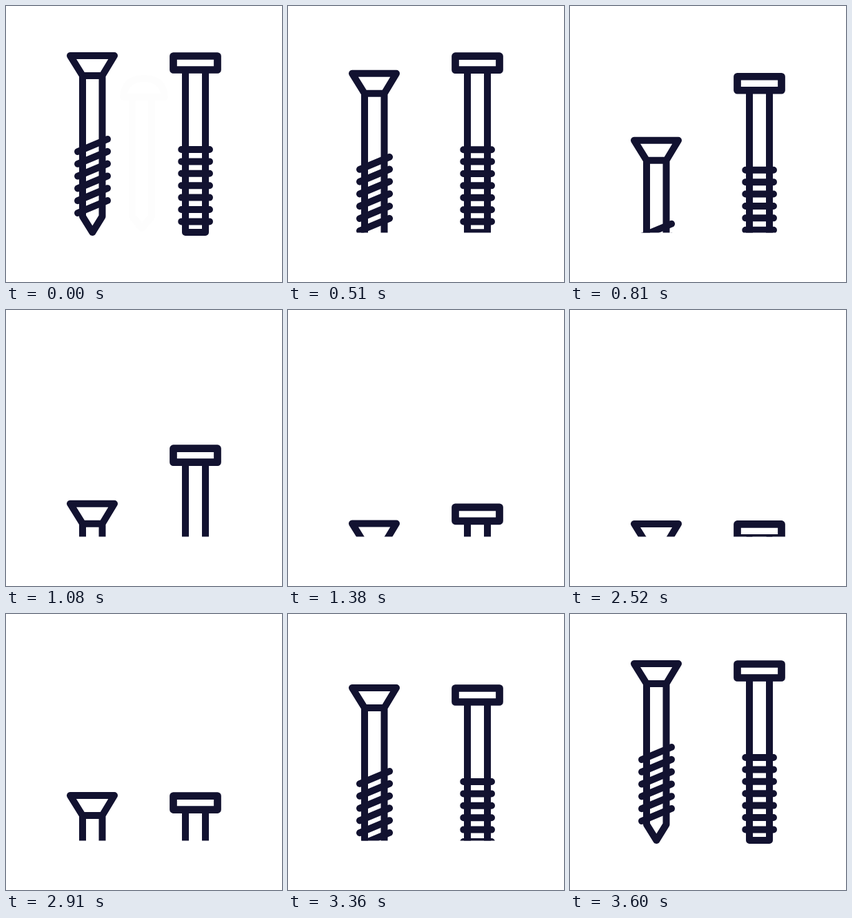
Write an HTML page that moves like this. It is 400 px wide and 400 px high and loops after 4130 ms.

```html
<!DOCTYPE html>
<html lang="en">
<head>
<meta charset="utf-8">
<title>Screw and bolt</title>
<style>
  html, body { margin: 0; width: 100%; height: 100%; overflow: hidden; background: #fff; }
  svg { display: block; width: 100vw; height: 100vh; }
</style>
</head>
<body>
<svg viewBox="0 0 400 400" fill="none" stroke="#121230" stroke-width="10" stroke-linecap="round" stroke-linejoin="round">
  <clipPath id="ground"><rect width="400" height="328.5"/></clipPath>
  <path id="ghost" stroke="#fdfdfd" d="M170 132Q172 105 200 105T230 132ZM183 132V305L197 322L211 305V132"/>
  <g id="stage">
    <g id="screw">
      <path d="M93 72H157L139.5 101H111ZM111 101V305L125.3 328L139.5 305V101"/>
      <path id="spiral"/>
    </g>
    <g id="bolt">
      <rect x="242.5" y="72.5" width="64" height="20" stroke-width="10.7"/>
      <path d="M260 93V328H289V93"/>
      <path id="rings"/>
    </g>
  </g>
</svg>
<script>
const LOOP = 4130, STEP = 30, DEPTH = 240;
const $ = id => document.getElementById(id);
const repeat = (count, make) => Array.from({ length: count }, (_, i) => make(i)).join('');

$('spiral').setAttribute('d', repeat(6, i => `M104 ${211 + 17.8 * i}L147 ${193 + 17.8 * i}`));
$('rings').setAttribute('d', repeat(7, i => `M254.3 ${208 + 17.4 * i}H295`));

// Eased progress along cubic-bezier(a, 0, b, 1).
function ease(t, start, end, a, b) {
  const x = Math.min(1, Math.max(0, (t - start) / (end - start)));
  let low = 0, high = 1;
  for (let i = 0; i < 30; i++) {
    const s = (low + high) / 2, r = 1 - s;
    if (3 * a * s * r * r + 3 * b * s * s * r + s * s * s < x) low = s;
    else high = s;
  }
  return low * low * (3 - 2 * low);
}

function sink(id, down, up) {
  $(id).setAttribute('transform', `translate(0 ${(DEPTH * (down - up)).toFixed(2)})`);
}

function draw(now) {
  const t = Math.floor((now % LOOP) / STEP) * STEP;
  const up = ease(t, 2400, 3600, .64, .667);
  sink('screw', ease(t, 120, 1530, .6, .36), up);
  sink('bolt', ease(t, 480, 1800, .5, .34), up);
  $('stage').setAttribute('clip-path', t > 120 && t < 3480 ? 'url(#ground)' : 'none');
  $('ghost').setAttribute('visibility', t < STEP ? 'visible' : 'hidden');
}

const begin = performance.now();
function tick() {
  draw(performance.now() - begin);
  requestAnimationFrame(tick);
}
tick();
</script>
</body>
</html>
```
